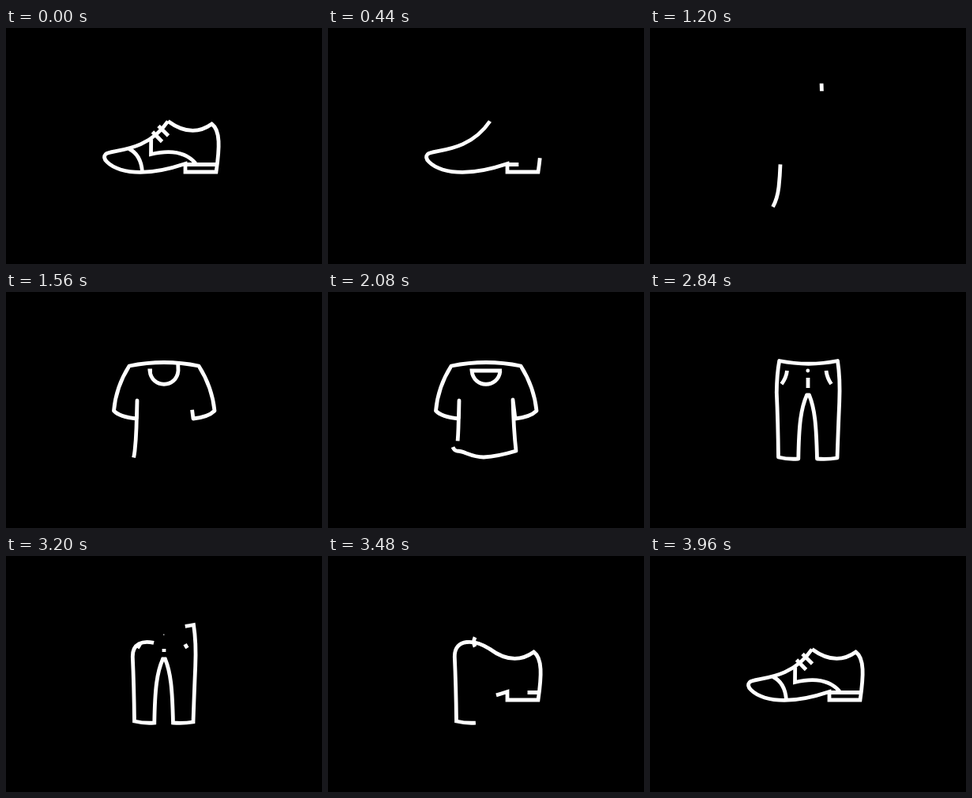
These frames come from a looping animation (400x300 px, 4000 ms). An HTML page:

```html
<!DOCTYPE html>
<html lang="en">
<head>
<meta charset="utf-8">
<title>Clothes line</title>
<style>
html, body { margin: 0; width: 100%; height: 100%; overflow: hidden; background: #000; }
svg { display: block; width: 100%; height: 100%; }
path { fill: none; stroke: #fff; stroke-width: 4.8; stroke-miterlimit: 6; }
circle { fill: #fff; }
</style>
</head>
<body>
<svg viewBox="0 0 400 300"><circle cx="199.8" cy="100" r="0"/></svg>
<script>
const LOOP = 4000;
const svg = document.querySelector('svg');
const dot = document.querySelector('circle');

const ease = (t, a, b) => {
  const x = Math.min(1, Math.max(0, (t - a) / (b - a)));
  return x * x * (3 - 2 * x);
};

// One line runs through all three garments: entry, shirt, link, trousers, link, shoe.
const outline = [
  'M154 230Q161 219 163 202',
  'Q164.5 188 165 173L166 138L165.5 161Q144 159 136.5 151Q139 121 156 94Q200 85 244 94' +
  'Q261 121 264 151Q256 159 237 161L234 137Q235 175 238 202Q215 209 197 210Q188 210 175 205Q168 202 163 202',
  'C155 200 155.5 185 157 165C158 150 160 140 160.3 128',
  'Q160.5 105 163.7 87.5Q201 95 237.5 87.5Q241 110 239.7 140Q238 180 237 211Q225 213 211.5 212' +
  'C210.5 168 208.5 148 201.5 131L198.5 131C191 148 188.5 168 187.8 212Q175 213 162.5 210Q162 165 160.3 128',
  'C160 104 186 106 204.5 118',
  'C226 134 244 134 260.5 122C271.5 130 270.5 152 266 183L227 183L227 172.5' +
  'C190 185 165 186 145 180C130 175 121 166 126 160.5C132 154 177 160 205 118.5'
];

// Keys are [from ms, to ms, index of the part boundary reached].
function line(parts, tail, head) {
  const path = document.createElementNS('http://www.w3.org/2000/svg', 'path');
  svg.append(path);
  let d = '';
  const ends = [0];
  for (const p of parts) {
    path.setAttribute('d', d += p);
    ends.push(path.getTotalLength());
  }
  const at = (keys, t) => {
    let pos = 0, last = 0;
    for (const [a, b, i] of keys) {
      pos += (ends[i] - last) * ease(t, a, b);
      last = ends[i];
    }
    return pos;
  };
  return { path, draw(t) {
    const from = at(tail, t), size = at(head, t) - from;
    path.style.display = size > 0.1 ? '' : 'none';
    path.setAttribute('stroke-dasharray', `0 ${from} ${Math.max(0, size)} 9999`);
  } };
}

const stroke = (d, a, b, c, e) => line([d], [[c, e, 1]], [[a, b, 1]]);

const body = line(outline,
  [[1040, 1840, 1], [2020, 2720, 3], [3010, 3730, 5], [4197, 4900, 6]],
  [[1040, 1840, 2], [2030, 2840, 4], [3060, 3840, 6]]);

const lines = [
  body,
  line(['M217 67L218 100', 'C216 123 184 123 182 100L220 100'],
    [[1040, 1840, 1], [2060, 2560, 2]], [[1040, 1840, 2]]),
  stroke('M173.5 100Q172.5 109 166.5 117', 2600, 2840, 3030, 3300),
  stroke('M223 100Q224 109 229.5 117', 2600, 2840, 3030, 3300),
  stroke('M200 109L200 122', 2600, 2840, 3030, 3300),
  line(['M190 97Q181 108 187 117Q184 128 183.7 141', 'L183.5 160.5Q222 151 240 172'],
    [[3320, 3960, 1], [4130, 4430, 2]], [[3320, 3960, 2]]),
  stroke('M268 173.5L227 173.5', 3270, 3776, 4150, 4633),
  stroke('M155.5 153.5Q171 161 172.5 183', 3640, 3920, 4130, 4430),
  stroke('M185.5 132L197.5 144.5', 3700, 3960, 4130, 4400),
  stroke('M193 124.5L205.5 137', 3700, 3960, 4130, 4400)
];

function frame(now) {
  const ms = now % LOOP;
  const t = ms < 960 ? ms + LOOP : ms;
  body.path.setAttribute('stroke-linejoin', t < 3040 ? 'round' : 'miter');
  for (const l of lines) l.draw(t);
  dot.setAttribute('r', 2.4 * (ease(t, 2600, 2840) - ease(t, 3030, 3300)));
  requestAnimationFrame(frame);
}
frame(performance.now());
</script>
</body>
</html>
```
